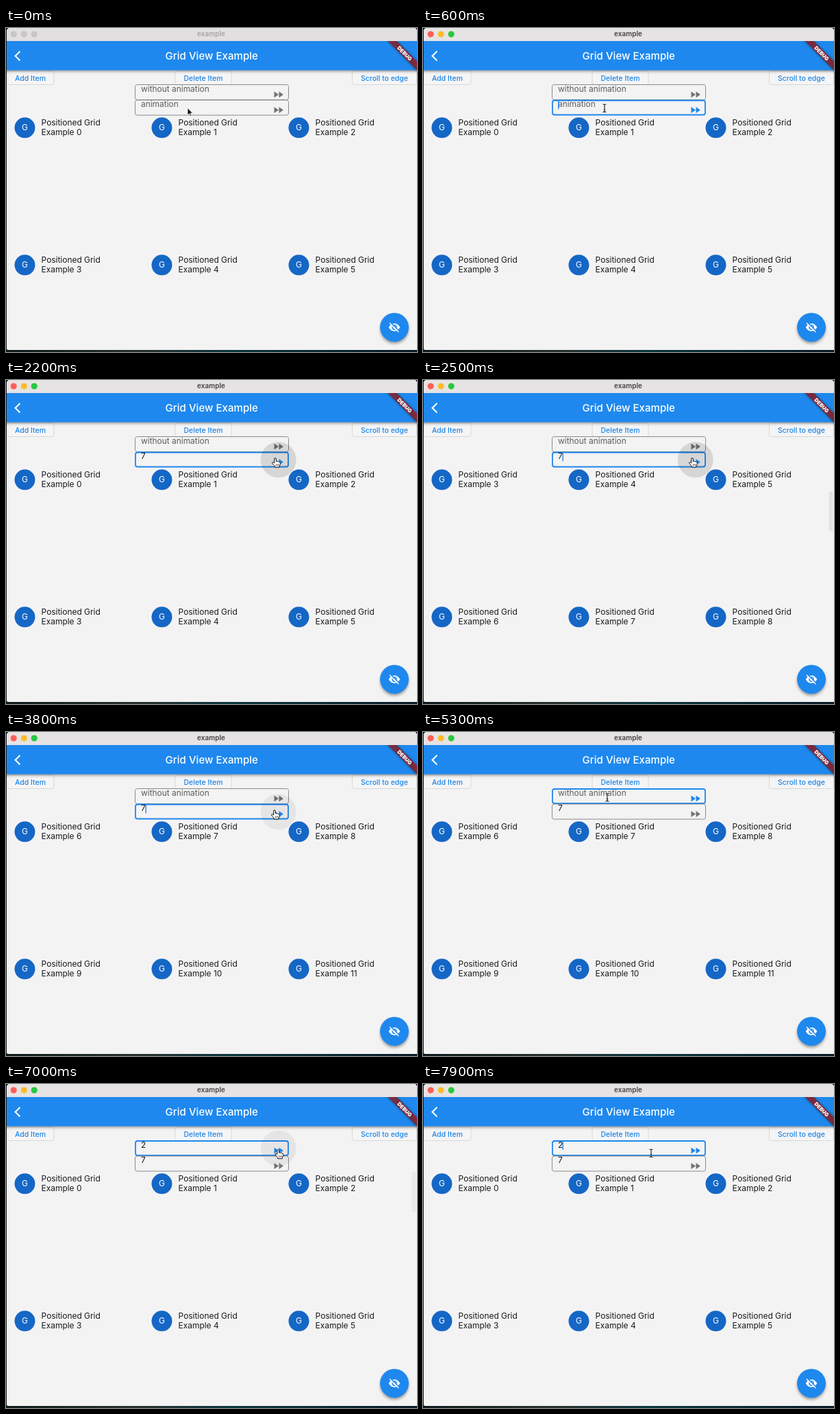
An HTML page that plays this animation: 600 px wide and 472 px high, repeating every 8000 ms.

```html
<!DOCTYPE html>
<html lang="en">
<head>
<meta charset="utf-8">
<title>example</title>
<style>
  html, body { margin: 0; width: 100%; height: 100%; overflow: hidden; background: #101c20; }
  svg { display: block; width: 600px; height: 472px; font-family: Inter, Roboto, sans-serif; }
  text { white-space: pre; }
  .mid { text-anchor: middle; }
  .body { font-size: 12px; letter-spacing: -.04px; }
  .btn { font-size: 10.5px; font-weight: 500; fill: #1c85e8; }
</style>
</head>
<body>
<svg id="stage" viewBox="0 0 600 472">
  <defs>
    <linearGradient id="desk">
      <stop offset="0" stop-color="#101a1d"/><stop offset=".3" stop-color="#29302c"/>
      <stop offset=".55" stop-color="#0b3840"/><stop offset="1" stop-color="#0a1c26"/>
    </linearGradient>
    <filter id="soft" x="-30%" y="-30%" width="160%" height="160%"><feGaussianBlur stdDeviation="2"/></filter>
    <clipPath id="win"><path d="M1 5Q1 0 6 0H595Q600 0 600 5V469H3Q1 469 1 467Z"/></clipPath>
    <clipPath id="view"><rect x="1" y="127" width="599" height="342"/></clipPath>
    <clipPath id="app"><rect x="1" y="19" width="599" height="450"/></clipPath>
  </defs>
  <rect width="600" height="472" fill="url(#desk)"/>
  <g clip-path="url(#win)">
    <rect width="600" height="472" fill="#f4f3f4"/>
    <g clip-path="url(#view)"><g id="grid"></g></g>
    <rect id="thumb" x="592.5" width="6" height="58" rx="1.5" fill="#000"/>
    <g id="buttons"></g>
    <g id="fields"></g>
    <g clip-path="url(#app)">
      <rect x="-4" y="24" width="608" height="39" fill="#000" opacity=".42" filter="url(#soft)"/>
      <rect y="19" width="600" height="42.5" fill="#1e88ee"/>
      <path d="M20.500 34 13.600 40.700l6.900 6.700" fill="none" stroke="#fff" stroke-width="2.100"/>
      <text class="mid" x="300.200" y="45.900" font-size="15" font-weight="500" letter-spacing=".04" fill="#fff">Grid View Example</text>
      <g transform="translate(600 19) rotate(45)">
        <rect x="-34" y="21" width="68" height="9" fill="#000" opacity=".45" filter="url(#soft)"/>
        <rect x="-34" y="21" width="68" height="9" fill="#782b3e"/>
        <text class="mid" y="28.200" font-size="7.600" font-weight="900" fill="#fff">DEBUG</text>
      </g>
    </g>
    <rect id="bar" width="600" height="19"/>
    <g id="lights"></g>
    <text id="title" class="mid" x="299.500" y="12.200" font-size="10" font-weight="600">example</text>
    <g transform="translate(567 436)">
      <circle cy="3" r="20.500" opacity=".4" filter="url(#soft)"/>
      <circle r="21" fill="#1e88ee"/>
      <g transform="scale(.75) translate(-12 -12)">
        <path d="M1 12Q4.500 4.500 12 4.500T23 12Q19.500 19.500 12 19.500T1 12" fill="#fff"/>
        <circle cx="12" cy="12" r="5" fill="#1e88ee"/>
        <circle cx="12" cy="12" r="3" fill="#fff"/>
        <path d="M4 2.200 21.800 20" stroke="#1e88ee" stroke-width="2"/>
        <path d="M2.600 3.600 20.400 21.400" stroke="#fff" stroke-width="1.800"/>
      </g>
    </g>
  </g>
  <g id="pointer">
    <path id="arrow" d="M0 0V10.600L2.500 8.300 4.100 12 5.800 11.300 4.200 7.700H7.600Z" fill="#111" stroke="#fff" stroke-width=".8"/>
    <g id="beam" fill="none">
      <path d="M-2.500-5.500Q0-5.500 0-4V4.500Q0 6-2.500 6M2.500-5.500Q0-5.500 0-4V4.500Q0 6 2.500 6M-1.200 2.500H1.200" stroke="#fff" stroke-width="2.200" opacity=".7"/>
      <path d="M-2.500-5.500Q0-5.500 0-4V4.500Q0 6-2.500 6M2.500-5.500Q0-5.500 0-4V4.500Q0 6 2.500 6M-1.200 2.500H1.200" stroke="#111" stroke-width="1.100"/>
    </g>
    <g id="hand">
      <path d="M-1.300 7V1Q-1.300-.3 0-.3T1.300 1V4.500Q2.300 3.700 3.300 4.800 4.500 4.100 5.300 5.300 7.300 4.900 7.300 6.800V8.700Q7.300 10.300 6 11.300V13H-.6V11.500Q-2.500 9.800-4.200 7.300-4.800 5.900-3.600 5.700-2.500 5.700-1.300 7Z" fill="#fff" stroke="#111" stroke-width="1"/>
      <path d="M1.400 8.500V11M3.200 8.500V11M5 8.500V11" stroke="#111" stroke-width=".7"/>
    </g>
  </g>
</svg>
<script>
const LOOP = 8000, STEP = 100, ROW = 200, ROWS = 10, TOP = 128, VIEW = 342;
const BLUE = "#1e88ee", GREY = "#8c8b8c";
const $ = id => document.getElementById(id);

function add(parent, tag, attrs, text) {
  const el = document.createElementNS("http://www.w3.org/2000/svg", tag);
  for (const k in attrs) el.setAttribute(k, attrs[k]);
  if (text !== undefined) el.textContent = text;
  return parent.appendChild(el);
}
const set = (el, attrs) => { for (const k in attrs) el.setAttribute(k, attrs[k]); };
const show = (el, on) => el.setAttribute("visibility", on ? "visible" : "hidden");
const ramp = (t, a, b) => Math.min(1, Math.max(0, (t - a) / (b - a)));
const ease = p => p < .5 ? 2 * p * p : 1 - 2 * (1 - p) ** 2;

for (let i = 0; i < ROWS * 3; i++) {
  const x = i % 3 * 200, y = TOP + Math.floor(i / 3) * ROW;
  add($("grid"), "circle", { cx: x + 27.5, cy: y + 17.3, r: 15, fill: "#1567c6" });
  add($("grid"), "text", { class: "mid", x: x + 27.5, y: y + 21.4, "font-size": 12, fill: "#fff" }, "G");
  ["Positioned Grid", "Example " + i].forEach((s, n) =>
    add($("grid"), "text", { class: "body", x: x + 51.6, y: y + 14 + n * 14.3, fill: "#1b1b1b" }, s));
}

[["Add Item", 1, 70], ["Delete Item", 247, 329], ["Scroll to edge", 505.5, 599.5]].forEach(([s, a, b]) => {
  add($("buttons"), "rect", { x: a, y: 62.5, width: b - a, height: 20, rx: 3, fill: "#f6f5f6", stroke: "#dad9da" });
  add($("buttons"), "text", { class: "btn mid", x: (a + b) / 2, y: 76.7 }, s);
});

const lights = ["#fe5f57", "#febc2e", "#28c840"].map((color, i) =>
  ({ color, el: add($("lights"), "circle", { cx: 11.2 + i * 15, cy: 9, r: 4.6 }) }));

// Input fields: hint, typed text, when it is typed, the focus span, the press and hover spans
const fields = [
  { y: 82.5, hint: "without animation", value: "2", typed: 5450, from: 4800, to: LOOP, press: [6050, 6500], hover: [5800, 7150] },
  { y: 105, hint: "animation", value: "7", typed: 1330, from: 500, to: 4800, press: [2150, 2650], hover: [2000, 4400] }
];
for (const f of fields) {
  const g = $("fields"), y = f.y + 10.4;
  f.box = add(g, "rect", { rx: 3, fill: "none" });
  f.hintEl = add(g, "text", { class: "body", x: 197, y, fill: "#5e5d5e" }, f.hint);
  f.textEl = add(g, "text", { class: "body", x: 197, y, fill: "#1b1b1b" }, f.value);
  f.caret = add(g, "rect", { y: f.y + .3, width: 1.4, height: 13, fill: BLUE });
  f.halo = add(g, "circle", { cx: 397.7, cy: f.y + 11.2, r: 26, fill: "#000" });
  const m = f.y + 14.5;
  f.icon = add(g, "path", { d: `M391.500 ${m - 4.4}l6.500 4.400-6.500 4.400zM398.500 ${m - 4.4}l6.500 4.400-6.500 4.400z` });
}

// Pointer stops: time, x, y
const path = [
  [0, 265, 116.5], [1500, 265, 116.5], [2100, 393, 114], [2600, 393, 114], [3700, 392, 114],
  [4300, 392, 114], [4750, 269, 95], [5500, 269, 95], [5900, 400, 95.5],
  [6900, 400, 95.5], [7600, 333, 100.5], [LOOP, 333, 100.5]
];
function pointerAt(t) {
  const i = path.findIndex(p => p[0] > t), a = path[i - 1], b = path[i];
  const p = ease(ramp(t, a[0], b[0]));
  return [a[1] + (b[1] - a[1]) * p, a[2] + (b[2] - a[2]) * p];
}

function offsetAt(t) {
  return t < 6300 ? 2 * ROW * ease(ramp(t, 2200, 2800)) : 0;
}
function thumbAlpha(t) {
  const pulse = (on, off) => ramp(t, on, on + 200) - ramp(t, off, off + 300);
  return .065 * (pulse(2200, 3400) + pulse(6250, 6900));
}

function draw(t) {
  const active = t >= 500;
  set($("bar"), { fill: active ? "#e6e3e4" : "#e2dfe0" });
  set($("title"), { fill: active ? "#434143" : "#a5a3a4" });
  for (const l of lights) set(l.el, { fill: active ? l.color : "#c8c5c6" });

  const offset = offsetAt(t);
  set($("grid"), { transform: `translate(0 ${-offset})` });
  set($("thumb"), { y: TOP + offset * VIEW / (ROW * ROWS), opacity: thumbAlpha(t) });

  for (const f of fields) {
    const focus = t >= f.from && t < f.to, typed = t >= f.typed;
    const within = ([a, b]) => t >= a && t < b;
    const inset = focus ? .5 : 0;
    set(f.box, {
      x: 188.5 + inset, y: f.y + inset, width: 224 - 2 * inset, height: 22 - 2 * inset,
      stroke: focus ? BLUE : GREY, "stroke-width": focus ? 1.8 : 1
    });
    set(f.icon, { fill: focus ? BLUE : "#757475" });
    set(f.hintEl, { opacity: 1 - ramp(t, f.typed, f.typed + 170) });
    show(f.textEl, typed);
    const since = t - (typed ? f.typed : f.from);
    show(f.caret, focus && since % 1000 < 500);
    set(f.caret, { x: typed ? 203.5 : 197 });
    set(f.halo, { opacity: within(f.press) ? .12 : within(f.hover) ? .06 : 0 });
  }

  const [x, y] = pointerAt(t);
  set($("pointer"), { transform: `translate(${x} ${y})` });
  show($("arrow"), !active);
  show($("beam"), active && x < 383);
  show($("hand"), active && x >= 383);
}

const start = performance.now();
function tick() {
  const t = (performance.now() - start) % LOOP;
  draw(Math.floor(t / STEP) * STEP);
  requestAnimationFrame(tick);
}
tick();
</script>
</body>
</html>
```
